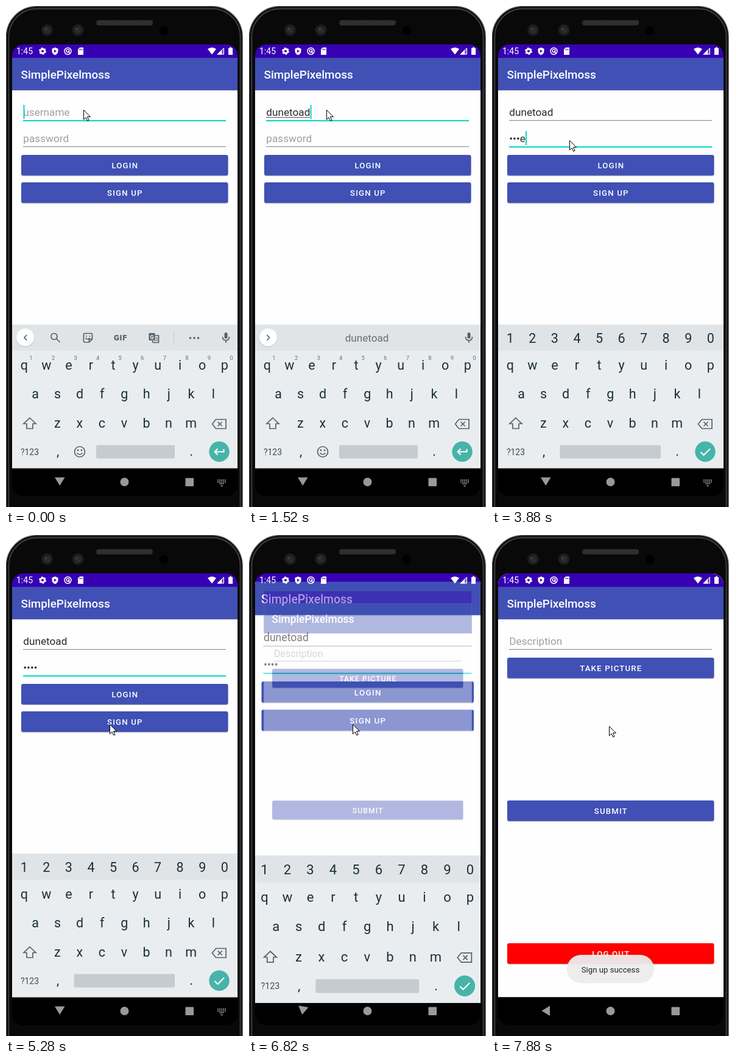
These frames come from a looping animation (389x821 px, 8 s). An HTML page:

```html
<!DOCTYPE html>
<html lang="en">
<head>
<meta charset="utf-8">
<title>Sign up flow</title>
<style>
  html, body { margin: 0; width: 100%; height: 100%; overflow: hidden; background: #fff; }
  svg { display: block; width: 389px; height: 821px; font-family: Roboto, sans-serif; }
  text { white-space: pre; }
  .mid { text-anchor: middle; }
  .line { fill: none; stroke: #566267; stroke-width: 1.7; }
  .key { font-size: 21.5px; fill: #1b3038; }
</style>
</head>
<body>
<script>
const LOOP = 8000;
const APP = 'SimplePixelmoss', USER = 'dunetoad';
const BLUE = '#4050b4', PURPLE = '#3700b3', TEAL = '#08d6c5', GREY = '#566267';
const PITCH = 36.55;

// Markup helpers
const rect = (x, y, w, h, fill, more = '') =>
  `<rect x="${x}" y="${y}" width="${w}" height="${h}" fill="${fill}" ${more}/>`;
const circle = (x, y, r, fill, more = '') =>
  `<circle cx="${x}" cy="${y}" r="${r}" fill="${fill}" ${more}/>`;
const text = (x, y, size, fill, str, more = '') =>
  `<text x="${x}" y="${y}" font-size="${size}" fill="${fill}" ${more}>${str}</text>`;
const path = (d, more = 'class="line"') => `<path d="${d}" ${more}/>`;
const group = (id, ...parts) => `<g id="${id}">${parts.join('')}</g>`;
const key = (x, y, str) => `<text class="key mid" x="${x}" y="${y}">${str}</text>`;
const keyRow = (chars, x, y) => [...chars].map((c, i) => key(x + i * PITCH, y, c)).join('');

const button = (y, label, fill = BLUE, id = '') =>
  rect(25, y + 1, 339.5, 34, '#000', 'rx="3" opacity=".2"') +
  rect(25, y, 339.5, 33.7, fill, `rx="3" ${id && `id="${id}"`}`) +
  text(195.3, y + 22, 13.2, '#fff', label, 'class="mid" font-weight="500" letter-spacing="1.18"');

const appBar = () =>
  rect(10, 138, 370, 1, '#000', 'opacity=".15"') + rect(10, 85, 370, 53, BLUE) +
  text(24.5, 119, 18.9, '#fff', APP, 'font-weight="500"');

const field = (y, id, hint) =>
  text(28.3, y + 6, 17.2, '#9f9f9f', hint, `id="${id}Hint"`) +
  text(28.3, y + 6, 17.2, '#2b2b2b', '', `id="${id}"`) +
  rect(28, y + 13, 333, 1, '#858585', `id="${id}Line"`);

function phone() {
  const hatch = Array.from({ length: 30 }, (_, i) => `M${150 + i * 3} 31l3-7`).join('');
  const lens = x => circle(x, 39.5, 9.5, '#1c1d1e') + circle(x, 39.5, 6, '#24292c') +
    circle(x - 2, 38, 2, '#364047') + circle(x + 2, 42, 1.4, '#2c383f');
  return rect(.5, .7, 387.5, 900, '#0b0b0b', 'rx="50" stroke="#4a4a4a" stroke-width="1.5"') +
    rect(4.5, 4.5, 380, 900, 'none', 'rx="46" stroke="#505050" stroke-width="1.3"') +
    rect(6.5, 7, 376, 900, '#090909', 'rx="44"') +
    rect(148, 23, 93, 9, '#292929', 'rx="4"') + path(hatch, 'stroke="#3b3b3b" fill="none"') +
    lens(67.5) + lens(118) + circle(259, 40, 7.5, '#000');
}

function statusIcons() {
  const white = 'fill="#fff"';
  return text(17, 79, 14, '#fff', '1:45') +
    circle(60, 74, 3.5, 'none', 'stroke="#fff" stroke-width="2.8"') +
    circle(60, 74, 5.1, 'none', 'stroke="#fff" stroke-width="1.8" stroke-dasharray="2.67"') +
    path('M80.5 68l5 2v4q0 4-5 6.500q-5-2.500-5-6.500v-4z', white) +
    path('M79 71.500l4 2.500l-4 2.500z', `fill="${PURPLE}"`) +
    circle(101.5, 74, 5.5, 'none', 'stroke="#fff" stroke-width="1.5"') +
    circle(101.5, 73.5, 2.4, 'none', 'stroke="#fff" stroke-width="1.4"') +
    path('M102 74l3.500 4', 'stroke="#fff" stroke-width="1.5"') +
    path('M121 68h6v12h-9v-9z', white) +
    path('M121 70v2.500m2-2.500v2.500m2-2.500v2.500', `stroke="${PURPLE}"`) +
    path('M331 70.500q7-5 14 0l-7 9z', white) +
    path('M358 68v11.500h-11.500z', 'fill="#fff" opacity=".35"') +
    path('M354 72v7.500h-7.500z', white) + path('M357.500 69v10h-10z', 'fill="none" stroke="#fff"') +
    path('M365 69h2v-1.500h3v1.500h2v11h-7z', white);
}

function toolbar() {
  return path('M34 539l-4 4.500l4 4.500', 'class="line" id="chevron"') + group('tools',
    circle(79, 541.5, 5, 'none', 'class="line"'), path('M82.500 545l6 6', 'class="line"'),
    path('M129 536.500h11q1.500 0 1.500 1.500v8l-5 5h-7.500q-1.500 0-1.500-1.500v-11.500q0-1.500 1.500-1.500zM141 546h-4.500v4.500M130.500 544q3.500 4 7 0'),
    circle(132, 541, 1, GREY), circle(137.5, 541, 1, GREY),
    text(188, 548, 13, GREY, 'GIF', 'class="mid" font-weight="900" letter-spacing=".7"'),
    rect(234.5, 536, 10, 12, GREY, 'rx="1"'), path('M244 540h6.500v11.500h-9l-1.500-3'),
    text(239.5, 545.5, 9, '#fff', 'G', 'class="mid" font-weight="700"'),
    text(247, 549, 8, GREY, '文', 'class="mid"'),
    rect(275, 533, 1, 21, '#c5cbcf'),
    [302.5, 309, 315.5].map(x => circle(x, 544, 1.8, GREY)).join(''));
}

function keyboard() {
  const digits = '1234567890';
  const small = [...digits].map((d, i) =>
    text(41 + i * PITCH, 580, 9.5, '#667278', d, 'class="mid"')).join('');
  return group('keyboard',
    rect(10, 522, 370, 235.5, '#e9edf0'), rect(10, 522, 370, 43, '#e0e4e7'),
    group('plainKeys',
      circle(31.5, 544, 15, '#aab1b5', 'opacity=".5"'), circle(31.5, 543, 14.5, '#fff'), toolbar(),
      text(193.5, 550, 17.1, '#667075', '', 'class="mid" id="suggestion"'),
      rect(358.5, 535, 5, 10, GREY, 'rx="2.5"'), path('M355.500 542q0 6 5.500 6t5.500-6m-5.500 6v4'),
      small,
      circle(121, 730.5, 8.5, 'none', 'class="line"'),
      circle(118, 728, 1.4, GREY), circle(124, 728, 1.4, GREY), path('M116.500 732.500q4.500 5 9 0'),
      rect(148, 719.5, 129, 22, '#c6cbcf', 'rx="2"')),
    group('secretKeys', keyRow(digits, 29.8, 552), rect(111.5, 719.5, 165.5, 22, '#c6cbcf', 'rx="2"')),
    keyRow('qwertyuiop', 29.8, 595.5), keyRow('asdfghjkl', 48, 643), keyRow('zxcvbnm', 84.3, 691),
    path('M39 675l10 9.500h-5v8h-10v-8h-5z'),
    path('M344.500 677.500h16.500v15h-16.500l-6-7.500zM347.500 681.500l7 7m0-7l-7 7'),
    text(39, 735.5, 14, '#3e4c52', '?123', 'class="mid"'),
    key(85, 737, ','), key(304, 737, '.'),
    circle(350, 730.3, 16.7, '#47b4a9'),
    path('M357.500 726v4.500h-15m5-5l-5 5l5 5', 'fill="none" stroke="#fff" stroke-width="2" id="enter"'),
    path('M342.500 731l5 5l10.500-10.500', 'fill="none" stroke="#fff" stroke-width="2" id="check"'));
}

function navIcons() {
  const dots = Array.from({ length: 10 }, (_, i) =>
    rect(347 + i % 5 * 3, 776 + (i / 5 | 0) * 3, 2, 2, '#8a8a8a')).join('');
  return path('M80 772.500h16.500l-8.250 13.500z', 'fill="#999" id="back"') +
    circle(194.5, 780, 7, '#999') + rect(294.5, 773.5, 13.5, 13.5, '#999', 'rx="1"') +
    group('imeIcon', dots, rect(350, 782, 8, 1.5, '#8a8a8a'),
      path('M351.500 785.500h5l-2.500 2.500z', 'fill="#8a8a8a"'));
}

document.body.innerHTML = `<svg viewBox="0 0 389 821">
  <clipPath id="glass"><rect x="10" y="63" width="370" height="740" rx="18"/></clipPath>
  ${phone()}
  <g clip-path="url(#glass)">
    ${rect(10, 63, 370, 740, '#000')}${rect(10, 63, 370, 22, PURPLE)}
    ${group('login', rect(10, 85, 370, 672.5, '#fefefe'), appBar(),
      field(174, 'user', 'username'), field(217, 'pass', 'password'),
      rect(28, 162, 2, 23, TEAL, 'id="caret"'), rect(28, 182, 1, 1, '#555', 'id="underline"'),
      button(244, 'LOGIN'), button(289, 'SIGN UP', BLUE, 'signUp'))}
    ${group('home', rect(10, 63, 370, 694.5, '#fefefe'), rect(10, 63, 370, 22, PURPLE), appBar(),
      field(174, 'desc', 'Description'), button(201, 'TAKE PICTURE'),
      button(435, 'SUBMIT'), button(669, 'LOG OUT', '#f00'))}
    ${rect(10, 757.5, 370, 46, '#000')}
    ${keyboard()}${statusIcons()}${navIcons()}
    ${group('toast', rect(123, 688, 143, 46.5, '#ededed', 'rx="23.2" opacity=".95"'),
      text(194.5, 717, 13.2, '#252525', 'Sign up success', 'class="mid"'))}
  </g>
  <path id="mouse" d="M.5 .5v15.500l3.600-3.400l2.600 5.600l2.400-1.100l-2.600-5.500h5z" fill="#fff" stroke="#000"/>
</svg>`;

// Step tables: [start time, value...], each value holds until the next row
const mouseSteps = [[0, 126, 170], [2140, 126, 182], [2290, 126, 205], [2450, 126, 220],
  [4590, 128, 230], [4730, 139, 260], [4870, 154, 294], [5010, 166, 318], [5140, 169, 315],
  [5280, 169, 310], [7730, 181, 312], [7880, 191, 313]];
const userSteps = [[0, 0], [420, 1], [550, 2], [680, 3], [810, 4], [1120, 5], [1320, 6], [1520, 8]];
const passSteps = [[0, ''], [3180, 'd'], [3320, '•u'], [3460, '••'], [3600, '••n'], [3880, '•••e'], [4730, '••••']];
const caretSteps = [[0, 1], [150, 0], [420, 1], [2140, 0], [2600, 1], [4310, 0], [4870, 1],
  [5280, 0], [5740, 1], [6380, 0]];
const pressSteps = [[0, BLUE], [5740, '#5f6dc1'], [5860, '#5261bb'], [5980, BLUE]];
// login scale, home scale, home opacity, keyboard shift, keyboard opacity, back angle, toast opacity
const sceneSteps = [[0, 1, .92, 0, 0, 1, 0, 0], [6820, 1.026, .923, .4, 0, 1, 9, 0],
  [6950, 1.07, .985, .9, 60, .5, 55, 0], [7080, 1.1, 1, 1, 0, 0, 83, 0],
  [7200, 1.1, 1, 1, 0, 0, 90, .6], [7330, 1.1, 1, 1, 0, 0, 90, 1]];

const el = id => document.getElementById(id);
const set = (id, attrs) => Object.entries(attrs).forEach(([k, v]) => el(id).setAttribute(k, v));
const show = (id, on) => set(id, { visibility: on ? 'visible' : 'hidden' });
const at = (steps, t) => steps.findLast(s => s[0] <= t).slice(1);
const zoom = (s, y) => `translate(195 ${y}) scale(${s}) translate(-195 ${-y})`;

function drawField(id, value, focused, y) {
  el(id).textContent = value;
  show(id + 'Hint', !value);
  set(id + 'Line', { fill: focused ? TEAL : '#858585', height: focused ? 2 : 1 });
  if (focused) set('caret', { x: 28.5 + el(id).getComputedTextLength(), y });
}

function draw(t) {
  const [mx, my] = at(mouseSteps, t);
  const [loginScale, homeScale, homeAlpha, shift, kbAlpha, angle, toastAlpha] = at(sceneSteps, t);
  const name = USER.slice(0, at(userSteps, t)[0]);
  const secret = t >= 2600, typing = name !== '' && !secret;

  set('mouse', { transform: `translate(${mx + 1} ${my})` });
  drawField('user', name, !secret, 162);
  drawField('pass', at(passSteps, t)[0], secret, 205);
  show('caret', at(caretSteps, t)[0]);
  show('underline', typing);
  set('underline', { width: el('user').getComputedTextLength() });
  set('signUp', { fill: at(pressSteps, t)[0] });

  el('suggestion').textContent = name;
  show('tools', !typing && !secret);
  show('plainKeys', !secret);
  show('suggestion', typing);
  set('chevron', { transform: typing ? 'translate(63.5 0) scale(-1 1)' : '' });
  show('secretKeys', secret);
  show('enter', !secret);
  show('check', secret);

  set('login', { transform: zoom(loginScale, 396), opacity: homeAlpha < 1 ? 1 : 0 });
  set('home', { transform: zoom(homeScale, 438), opacity: t < 6820 ? 0 : homeAlpha });
  set('keyboard', { transform: `translate(0 ${shift}) ${zoom(loginScale, 396)}`, opacity: kbAlpha });
  set('back', { transform: `rotate(${angle} 88 779.5)` });
  show('imeIcon', t < 6820);
  set('toast', { opacity: toastAlpha });
}

const start = performance.now();
function tick() {
  draw((performance.now() - start) % LOOP);
  requestAnimationFrame(tick);
}
tick();
</script>
</body>
</html>
```
